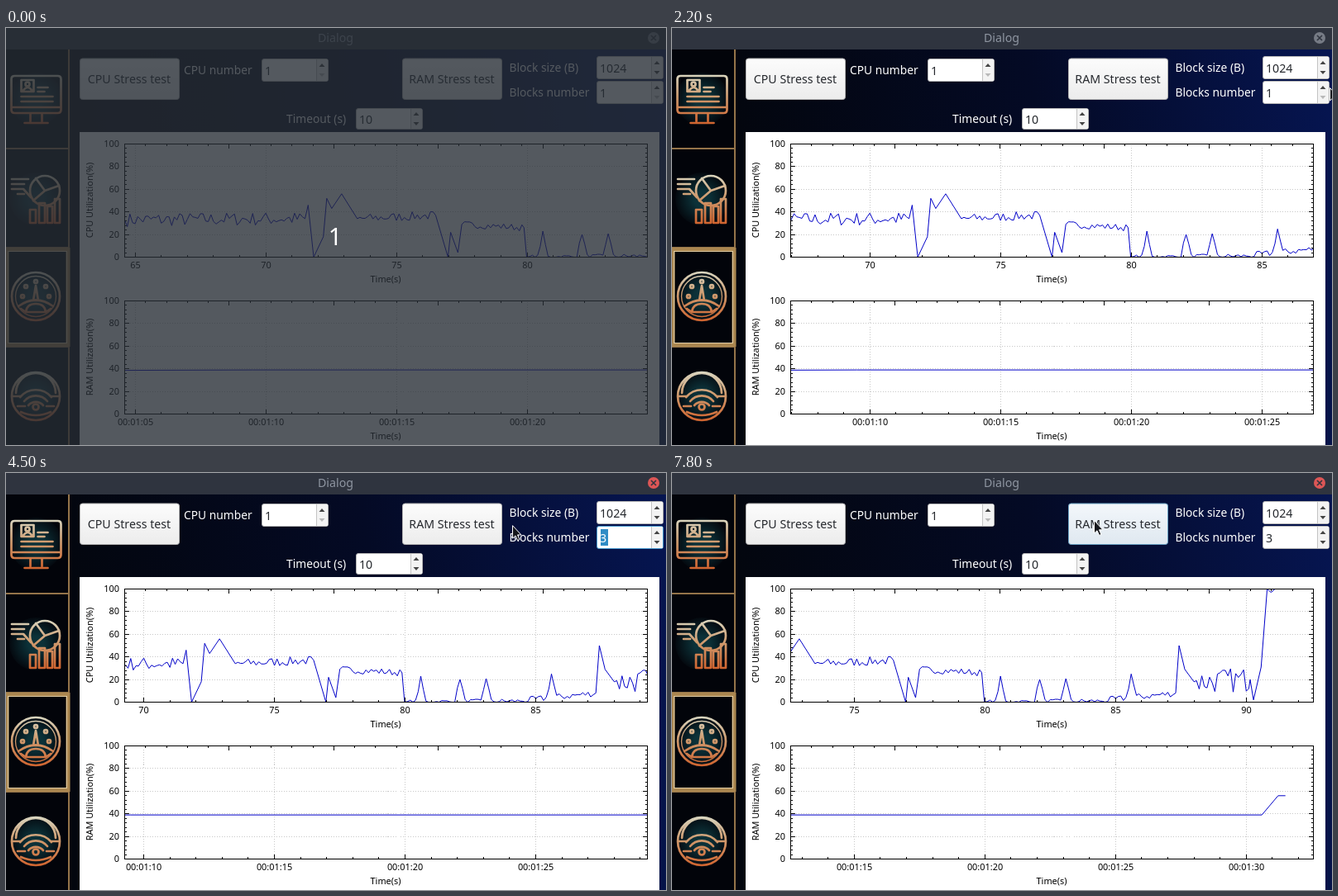
Write an HTML page that moves like this. It is 798 px wide and 505 px high and loops after 8 s.

```html
<!DOCTYPE html>
<html lang="en">
<head>
<meta charset="utf-8">
<title>Stress test dialog</title>
<style>
  html, body { margin: 0; width: 100%; height: 100%; overflow: hidden; background: #04070f; }
  svg { display: block; width: 798px; height: 505px; }
  text { font: 14.2px "Noto Sans", sans-serif; fill: #fff; }
  .label { font-size: 13.8px; font-weight: 500; }
  .dark { fill: #26292e; }
  .mid { text-anchor: middle; }
  .end { text-anchor: end; }
  .plot text { font-size: 10.9px; font-weight: 500; fill: #000; }
  .crisp { shape-rendering: crispEdges; fill: none; }
  .grid { stroke: #c8c8c8; stroke-dasharray: 1 2; }
  .axis { stroke: #000; }
  .curve { fill: none; stroke: #0000c8; }
  .icon { fill: none; stroke-width: 2.7; stroke-linecap: round; stroke-linejoin: round; }
</style>
</head>
<body>
<svg viewBox="0 0 798 505" xmlns="http://www.w3.org/2000/svg">
  <defs>
    <linearGradient id="navy" gradientUnits="userSpaceOnUse" x1="76" y1="126" x2="798" y2="26">
      <stop offset="0" stop-color="#03060e"/><stop offset=".5" stop-color="#040a25"/><stop offset="1" stop-color="#061551"/>
    </linearGradient>
    <linearGradient id="face" x2="0" y2="1">
      <stop offset="0" stop-color="#fcfcfc"/><stop offset="1" stop-color="#ececec"/>
    </linearGradient>
    <linearGradient id="lit" x2="0" y2="1">
      <stop offset="0" stop-color="#f3f7fb"/><stop offset="1" stop-color="#dfe8f0"/>
    </linearGradient>
    <linearGradient id="copper" gradientUnits="userSpaceOnUse" x1="0" y1="-30" x2="0" y2="30">
      <stop offset="0" stop-color="#d9d6c0"/><stop offset=".45" stop-color="#cf9c70"/><stop offset="1" stop-color="#d0642f"/>
    </linearGradient>
    <radialGradient id="glow">
      <stop offset=".3" stop-color="#0c3138"/><stop offset="1" stop-color="#04090f"/>
    </radialGradient>
    <clipPath id="area"><rect x="143" y="0" width="633" height="139"/></clipPath>
  </defs>

  <rect width="798" height="505" fill="url(#navy)"/>
  <rect width="798" height="26" fill="#2f343f"/>
  <text class="mid" x="398.500" y="17" style="fill:#8f96a2">Dialog</text>
  <circle id="close" cx="783" cy="12" r="7"/>
  <path d="M780 9l6 6m0-6l-6 6" stroke="#2f343f" stroke-width="1.6"/>

  <rect y="26" width="76" height="479" fill="#02040a"/>
  <path d="M76 26V505M0 146H76M0 266H76M0 386H76" stroke="#94744a" stroke-width="2"/>
  <rect x="1" y="268.500" width="74" height="115" fill="none" stroke="#ab8750" stroke-width="5"/>
  <rect x="2.500" y="270.500" width="71" height="111" fill="none" stroke="#e2cda3"/>

  <g class="icon" stroke="url(#copper)">
    <g transform="translate(36.500 86)">
      <circle r="32" fill="url(#glow)" stroke="none"/>
      <path d="M-26-28H26Q30-28 30-24V13Q30 17 26 17H-26Q-30 17-30 13V-24Q-30-28-26-28ZM-29 10H29M-7 17V27M7 17V27M-14 29H14"/>
      <path d="M-18-23H-3V-9H-18ZM-16-10Q-10-18-5-10M2-14H14M2-9H10M-18-3H20M-18 3H20"/>
      <circle cx="-10.500" cy="-18" r="2.500"/>
    </g>
    <g transform="translate(36 207)">
      <circle r="32" fill="url(#glow)" stroke="none"/>
      <circle cx="11" cy="-10" r="18"/>
      <path d="M11-10L0-25M11-10L28-16M11-10L-3 2M-29-24H-9M-29-18H-14M-29-12H-15L-6-2M-22-6H-14"/>
      <path d="M-7 29V13H0V29ZM4 29V5H11V29ZM14 29V9H20V29ZM23 29V0H29V29Z"/>
    </g>
    <g transform="translate(36 325)">
      <circle r="31" fill="url(#glow)" stroke="none"/>
      <circle r="29"/><circle r="24.500" stroke-width="1.300"/>
      <path d="M0-13L-3 5H3ZM-21 12Q0-3 21 12M-12 19Q-11 9 0 9T12 19ZM-18 15L-12 19M18 15L12 19"/>
      <circle cx="-16" r="2"/><circle cx="-12" cy="-12" r="2"/><circle cy="-18" r="2"/>
      <circle cx="12" cy="-12" r="2"/><circle cx="16" r="2"/>
    </g>
    <g transform="translate(36 446)">
      <circle r="31" fill="url(#glow)" stroke="none"/>
      <circle r="29"/>
      <path d="M-24-4A24 24 0 0 1 24-4M-28 0H-18M28 0H18M-19 1A25 25 0 0 1 19 1M-14 6A18 18 0 0 1 14 6M-9 11A12 12 0 0 1 9 11M-22 12H-13M22 12H13M-18 19Q0 27 18 19"/>
      <circle cy="13" r="3.500"/>
    </g>
  </g>

  <g id="form">
    <text class="label" x="215" y="56">CPU number</text>
    <text class="label" x="608.500" y="53">Block size (B)</text>
    <text class="label" x="608.500" y="83">Blocks number</text>
    <text class="label" x="339" y="115">Timeout (s)</text>
  </g>

  <rect x="89" y="126" width="701" height="379" fill="#fff"/>
  <g id="cpu" class="plot" transform="translate(0 140)"></g>
  <g id="ram" class="plot" transform="translate(0 330)"></g>

  <path id="cursor" d="M.5.5V16L4 12.800L6.600 18.500L9 17.400L6.500 11.800H11Z" fill="#15171c" stroke="#fff"/>
  <g id="shade">
    <rect width="798" height="505" fill="#272d35" fill-opacity=".79"/>
    <text class="mid" x="398" y="263" style="font-size:29px">1</text>
  </g>
</svg>

<script>
const $ = id => document.getElementById(id);
const LOOP = 8000, STEP = 100;
const X0 = 143.5, WIDTH = 632, SPAN = 20, PX = WIDTH / SPAN, HEIGHT = 137;

// Linear interpolation over [time, value, ...] keys
function lerp(keys, t, k = 1) {
  const i = keys.findIndex(p => p[0] > t);
  if (i < 0) return keys[keys.length - 1][k];
  if (i === 0) return keys[0][k];
  const a = keys[i - 1], b = keys[i];
  return a[k] + (b[k] - a[k]) * (t - a[0]) / (b[0] - a[0]);
}

let seed = 7;
const random = () => (seed = seed * 16807 % 2147483647) / 2147483647;

// CPU load as [second, percent, jitter until the next key]
const trend = [
  [64.6, 33, 6], [71.5, 34], [71.62, 46], [71.83, 0], [72.2, 18], [72.33, 52], [72.52, 43], [72.9, 56],
  [73.5, 34, 4], [76.5, 37], [76.97, 0], [77.07, 22], [77.35, 4], [77.5, 29, 3], [79.88, 26],
  [79.98, 0, 2], [84.4, 1, 3], [87.3, 8], [87.43, 50], [87.65, 29], [88, 18, 11], [90.15, 20],
  [90.28, 2], [90.57, 31], [90.8, 100], [90.95, 97], [91.1, 100], [91.5, 100]
];
const bursts = [80.6, 82.1, 83.1, 85.6];

function makeLoad() {
  const points = [];
  trend.forEach(([from, value, jitter], i) => {
    points.push([from, value]);
    if (!jitter) return;
    for (let t = Math.ceil(from * 10 + 1) / 10; t < trend[i + 1][0] - 0.05; t += 0.1) {
      const noise = (random() * 2 - 1) * jitter;
      const burst = bursts.reduce((h, at) => h + 21 * Math.max(0, 1 - Math.abs(t - at) / 0.2), 0);
      points.push([t, Math.max(0, lerp(trend, t) + noise + burst)]);
    }
  });
  return points;
}
const cpu = makeLoad();
const ram = [[60, 38.3], [69.5, 39], [90.6, 39], [91.22, 56], [91.5, 56]];

// Left end of the time axis, and the pointer path
const left = [[0, 64.6], [800, 65.57], [7800, 72.57]];
const pointer = [
  [800, 222, 16], [1400, 755, 88], [2200, 795, 72], [2400, 787, 75], [4000, 787, 75], [4800, 507, 56], [5000, 510, 57]
];

const clock = s => [s / 3600, s / 60 % 60, s % 60].map(n => String(Math.floor(n)).padStart(2, "0")).join(":");
const snap = n => Math.floor(n) + 0.5;
const yOf = v => HEIGHT + 0.5 - v * HEIGHT / 100;
const tickLength = i => i % 5 ? 2.5 : 5.5;

function button(x, label) {
  return `<g><rect x="${x + .5}" y="37" width="120" height="49.500" rx="3" fill="url(#face)" stroke="#b4b4b4"/>
    <text class="mid dark" x="${x + 60}" y="67">${label}</text></g>`;
}

function spin(x, y, h, value, atMin) {
  const c = y + h / 2, ax = x + 73;
  return `<g><rect class="box" x="${x + .5}" y="${y + .5}" width="80" height="${h - 1}" rx="2.500" fill="#fff" stroke="#b4b4b4"/>
    <rect x="${x + 67}" y="${y + 1}" width="13" height="${h - 2}" fill="#f3f3f3"/>
    <path d="M${x + 66.5} ${y + 1}V${y + h - 1}" stroke="#c4c4c4"/>
    <path d="M${ax - 3.5} ${c - 4}h7l-3.500-4z" fill="#444"/>
    <path class="down" d="M${ax - 3.5} ${c + 4}h7l-3.500 4z" fill="${atMin ? "#b9b9b9" : "#444"}"/>
    <rect class="mark" x="${x + 5}" y="${y + 4}" width="9" height="${h - 8}" fill="#308cc6" visibility="hidden"/>
    <text class="dark" x="${x + 4}" y="${c + 5.5}">${value}</text></g>`;
}

$("form").insertAdjacentHTML("beforeend",
  button(89, "CPU Stress test") + button(479, "RAM Stress test") +
  spin(309, 37, 28, 1, true) + spin(714, 34, 28, 1024) + spin(423, 97, 26, 10) + spin(714, 64, 28, 1, true));
const ramButton = $("form").children[5].querySelector("rect");
const blocks = $("form").lastElementChild;
const part = name => blocks.querySelector(name);

// Frame, fixed ticks and labels of one plot
function buildPlot(el, name) {
  let ticks = `M${X0} .5h${WIDTH}v${HEIGHT}h${-WIDTH}z`, grid = "", labels = "";
  for (let i = 0; i <= 25; i++) {
    const len = tickLength(i), y = snap(yOf(i * 4));
    ticks += `M${snap(X0 + i * WIDTH / 25)} .5v${len}M${X0} ${y}h${len}M${X0 + WIDTH} ${y}h${-len}`;
    if (i % 5 === 0) {
      grid += `M${X0} ${y}h${WIDTH}`;
      labels += `<text class="end" x="137" y="${y + 3.5}">${i * 4}</text>`;
    }
  }
  el.innerHTML = `<path class="crisp grid" d="${grid}"/><path class="crisp grid moving"/>
    <path class="curve" clip-path="url(#area)"/>
    <path class="crisp axis" d="${ticks}"/><path class="crisp axis moving"/>${labels}<g></g>
    <text class="mid" x="459" y="168">Time(s)</text>
    <text class="mid" transform="translate(105 68.500) rotate(-90)">${name} Utilization(%)</text>`;
}

function drawPlot(el, data, start, head, format) {
  const xOf = t => X0 + (t - start) * PX;
  let grid = "", ticks = "", labels = "";
  for (let s = Math.ceil(start); s <= start + SPAN; s++) {
    const x = snap(xOf(s));
    ticks += `M${x} ${HEIGHT + .5}v${-tickLength(s)}`;
    if (s % 5 === 0) {
      grid += `M${x} ${HEIGHT + .5}v${-HEIGHT}`;
      labels += `<text class="mid" x="${x}" y="151">${format(s)}</text>`;
    }
  }
  const seen = data.filter(p => p[0] < head).concat([[head, lerp(data, head)]]);
  const [gridPath, tickPath] = el.querySelectorAll(".moving");
  gridPath.setAttribute("d", grid);
  tickPath.setAttribute("d", ticks);
  el.querySelector("g").innerHTML = labels;
  el.querySelector(".curve").setAttribute("d",
    "M" + seen.map(([t, v]) => xOf(t).toFixed(1) + " " + yOf(v).toFixed(1)).join("L"));
}

function draw(t) {
  // The axis skips a beat at the end of each second
  const paused = t > 1000 && t % 1000 === 900;
  const start = lerp(left, paused ? t - STEP : t), head = Math.min(start + SPAN, 91.5);
  drawPlot($("cpu"), cpu, start, head, String);
  // The memory reading arrives late once the test begins
  drawPlot($("ram"), ram, start, head > 90.6 && head < 91.22 ? 90.6 : head, clock);

  $("shade").style.display = t < 100 ? "" : "none";
  $("cursor").style.display = t < 100 ? "none" : "";
  $("cursor").setAttribute("transform", `translate(${lerp(pointer, t)} ${lerp(pointer, t, 2)})`);
  $("close").setAttribute("fill", t < 2700 ? "#767b85" : "#dc5656");

  const focused = t >= 3000 && t < 5700, started = t >= 5700;
  part(".box").setAttribute("stroke", focused ? "#4a9bd0" : "#b4b4b4");
  part(".mark").setAttribute("visibility", focused ? "visible" : "hidden");
  part(".down").setAttribute("fill", t < 3000 ? "#b9b9b9" : "#444");
  part("text").textContent = t < 3000 ? 1 : t < 4000 ? 2 : 3;
  part("text").style.fill = focused ? "#fff" : "";
  ramButton.setAttribute("fill", started ? "url(#lit)" : "url(#face)");
  ramButton.setAttribute("stroke", started ? "#6ba3c4" : "#b4b4b4");
}

buildPlot($("cpu"), "CPU");
buildPlot($("ram"), "RAM");
let last = -1;
function tick() {
  const t = Math.floor(performance.now() % LOOP / STEP) * STEP;
  if (t !== last) draw(last = t);
  requestAnimationFrame(tick);
}
tick();
</script>
</body>
</html>
```
